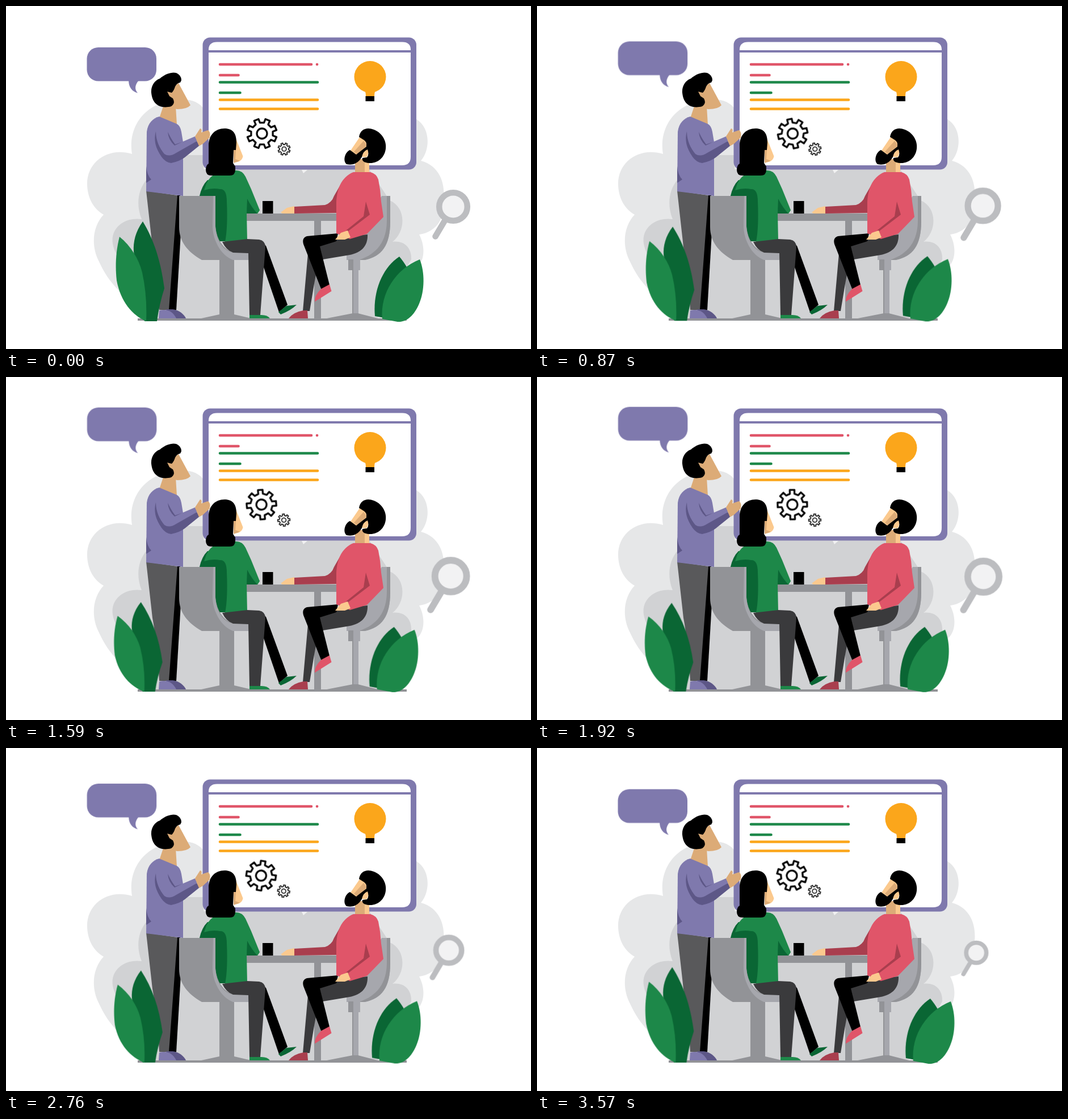
An HTML page that plays this animation: 925 by 605 pixels, repeating every 3600 ms.

```html
<!DOCTYPE html>
<html lang="en">
<head>
<meta charset="utf-8">
<title>Team meeting</title>
<style>
html, body { margin: 0; width: 100%; height: 100%; overflow: hidden; background: #fff; }
svg { display: block; width: 925px; height: 605px; }
svg g { transform-origin: 0 0; }
.purple { fill: #7f79ad; } .plum { fill: #5d5787; }
.green { fill: #1d8849; } .forest { fill: #0a6634; }
.red { fill: #e05569; } .wine { fill: #a93e4e; }
.skin { fill: #dcab77; } .peach { fill: #fbc98e; }
.grey { fill: #929397; } .silver { fill: #a6a7ad; }
.pants { fill: #59595b; } .dark { fill: #3a3a3c; }
.orange { fill: #fba61b; }
.rules path { fill: none; stroke-width: 4.6; stroke-linecap: round; }
.gear { fill: #fff; stroke: #0b0b0b; stroke-linejoin: round; }
</style>
</head>
<body>
<svg viewBox="0 0 925 605">
  <g id="clouds">
    <path fill="#e6e7e8" d="M349 182C338 166 316 162 300 168C255 166 213 205 222 261C180 248 143 275 143 313C143 338 154 358 172 368C152 389 150 423 163 449C172 469 183 486 198 501L240 551H690L724 461C738 449 739 424 728 403C752 400 772 381 769 354C777 318 766 282 731 273C748 253 748 214 722 199Z"/>
    <path fill="#d1d2d4" d="M248 306C232 324 229 352 239 376C208 372 184 392 188 419C190 430 194 438 200 445L240 551H655L714 447C715 425 700 413 681 416C706 396 704 354 676 343L640 288H348V263H300Z"/>
    <path fill="#f1f1f2" d="M521 289H531L524 295Z"/>
  </g>

  <g id="board">
    <rect class="purple" x="346.500" y="55.500" width="376.500" height="233" rx="13"/>
    <path fill="#fff" d="M357 78V77Q357 63.500 372 63.500H698Q713 63.500 713 77V78ZM357 82H713V266Q713 281 698 281H372Q357 281 357 266Z"/>
    <g class="rules">
      <path stroke="#e05569" d="M377 103H538M548 103h.1M377 122H409.500"/>
      <path stroke="#1d8849" d="M377 134.500H549M377 153H412.500"/>
      <path stroke="#fba61b" d="M377 165.500H549M377 181.500H549"/>
    </g>
    <circle class="orange" cx="641.500" cy="125" r="28"/>
    <path class="orange" d="M631 148H652Q649 151 649 160H634Q634 151 631 148Z"/>
    <path d="M633.500 159H649V168H633.500Z"/>
    <g id="bigGear" class="gear" stroke-width="3.300"></g>
    <g id="smallGear" class="gear" stroke-width="1.600"></g>
  </g>

  <g id="bubble" class="purple">
    <rect x="142.500" y="73" width="122.500" height="59.500" rx="20"/>
    <path d="M216 131C216 143 222 151 232 153.500C226 147 227 139 234 131Z"/>
  </g>

  <g id="lens">
    <path fill="none" stroke="#bcbdc0" stroke-width="10.500" stroke-linecap="round" d="M-14 23L-31.500 52.500"/>
    <circle r="24.800" fill="#f2f2f3" stroke="#bcbdc0" stroke-width="10.500"/>
  </g>

  <path class="grey" d="M232 551H706V555H232Z"/>

  <g id="presenter">
    <path d="M299 334H307L308 400L300 536H286Z"/>
    <path class="pants" d="M247 326L302 334L287 536H270C268 495 263 450 258 425Z"/>
    <path class="plum" d="M282 535H294C305 536 314 544 317 551H285Z"/>
    <path class="purple" d="M269 551L270 537Q291 532 300 551Z"/>
    <path class="skin" d="M277 177L270 198L301 209L299 177Z"/>
    <path class="skin" d="M284 150L304 136L325 175Q319 182 302 182L286 179Z"/>
    <path d="M256 153C255 141 262 131 271 128C281 119 293 116 300 118Q309 122 309 131L307 135Q301 136 298 142Q296 149 292 153L284 151L288 159L294 163Q299 172 291 177C272 182 258 174 256 153Z"/>
    <path class="purple" d="M248 222C250 206 259 198 270 195L301 208Q307 211 309 222L312 240V335L247 327Z"/>
    <path class="plum" d="M247 282Q248 298 256 306L247 312Z"/>
    <path class="plum" d="M264 221C260 236 263 250 274 266Q281 276 291 277Q306 274 315 267L341 246L336 238L285 260Z"/>
    <path class="purple" d="M264 221C264 238 271 251 279 261Q288 267 300 259L337 238L333 230L298 245L285 222L275 209Z"/>
    <path class="plum" d="M285 222Q286 236 297 246L310 240L298 244Q291 235 285 222Z"/>
    <path class="skin" d="M333 230L342 216Q346 217 344 223L356 219Q361 222 359 232L347 243L340 247Z"/>
  </g>

  <g id="table">
    <path class="grey" d="M420 366H586V379H555V551H543V379H420Z"/>
    <path d="M452 344H470.500V366H452Z"/>
  </g>

  <g id="woman">
    <path class="forest" d="M341 335Q345 317 355 307L380 312L395 340L390 415H369V335Z"/>
    <path class="green" d="M353 313Q360 299 372 295L404 290Q416 289 422 301L432 323L447 360L443 366L424 365L425 414L386 416Q391 390 389 345Q389 322 377 323Q364 320 349 325Z"/>
    <path class="forest" d="M425 340L424 366H443Q433 356 425 340Z"/>
    <path class="green" d="M427 337L447 360L443 366Q433 355 427 337Z"/>
    <path class="peach" d="M404 231L417.500 265Q416 275 402 276Z"/>
    <path class="skin" d="M401 254L405 253L404 270L412 273L401 277Z"/>
    <path d="M357 246C357 227 369 216 385 216C400 216 406 225 406 241L405 254H401L400 277L404 283V289Q404 299 394 299H362Q352 299 352 289Q352 281 357 278Z"/>
    <path class="grey" d="M305 335H369V390Q373 424 400 435L427 436V448H345C320 434 305 415 305 390Z"/>
    <path class="silver" d="M365 335H369V388C371 416 383 433 402 435H428V448H400C377 439 363 410 364 385Z"/>
    <path class="grey" d="M376 448H402V544L432 551V553H344V551L376 544Z"/>
    <path d="M450 417L458 423L496 527L481 540L452 455Z"/>
    <path class="dark" d="M381 416L425 411L446 412Q457 414 457 425L448 545H429L427 436L400 435Q388 431 381 416Z"/>
    <path class="green" d="M429 545H450Q461 545 465 551H429Z"/>
    <path class="forest" d="M480 540L494 529L512 527Q502 537 484 544Z"/>
  </g>

  <g id="guest">
    <path class="silver" d="M662 335H677V380C677 422 662 442 632 448H600V438L625 395Z"/>
    <path class="grey" d="M671 335H677V380C677 422 662 442 632 448H622C654 437 671 415 671 378Z"/>
    <path class="silver" d="M603 447H624V466H621V543H610V466H603Z"/>
    <path class="grey" d="M603 447H612V543H610V466H603ZM565 551L611 542H620L655 551V553H565Z"/>
    <path class="dark" d="M533 425L556 420L543 490L535 538H523Z"/>
    <path class="dark" d="M552 421L600 407L637 403C638 425 624 437 600 440L558 447Z"/>
    <path d="M585 401L530 406Q521 409 524 420L556 501L570 492L553 424L582 415Z"/>
    <path class="red" d="M555 499L570 491L573.500 503L544 521.500Q543 511 555 499Z"/>
    <path class="wine" d="M498 551Q506 540 524 537H531L532 551Z"/>
    <path class="skin" d="M615 270H640V294H615Z"/>
    <path class="peach" d="M632 276H640V294H632Z"/>
    <path class="wine" d="M594 307L578 335Q574 347 562 351L508 354V366L584 365Z"/>
    <path class="peach" d="M508 353L495 356L484 364L487 366H508Z"/>
    <path class="red" d="M612 293H642Q653 296 656 306Q660 325 661 345L665 372L636 402L606 411L582 401V350C582 325 590 302 612 293Z"/>
    <path class="wine" d="M634 345L641 368L603 397L599 396L630 371Z"/>
    <path class="peach" d="M580 412L590 400L602 396L607 408L597 412Z"/>
    <path class="peach" d="M624 230L607 255L618 263L636 252L634 235Z"/>
    <path class="skin" d="M630 238L636 246L624 257L618 261L613 257Z"/>
    <path d="M622 231C624 217 636 213 648 218C664 224 671 240 669 252C667 268 654 278 640 277Q626 276 628 268L636 267Q641 260 636 254L623 272Q614 282 600 279C593 273 597 258 606 254L617 262L635 248Q636 239 630 236Z"/>
    <path class="peach" d="M627 266Q629 256 637 253Q640 260 635 267Z"/>
  </g>

  <g id="leftPlant">
    <path class="forest" d="M5 -176C-8 -158 -12 -140 -11 -123L8 0H30Q34 -30 43 -58C37 -105 25 -143 5 -176Z"/>
    <path class="green" d="M-36 -149C-44 -118 -43 -90 -41 -72C-34 -34 -13 -10 11 0Q13 -45 4 -86C-2 -110 -16 -133 -36 -149Z"/>
  </g>
  <g id="rightPlant">
    <path class="forest" d="M693 442C664 461 646 502 650 547L666 550L707 462Q700 450 693 442Z"/>
    <path class="green" d="M729 447C738 469 738 502 728 525C719 546 706 558 690 557L663 552C659 506 687 464 729 447Z"/>
  </g>
</svg>

<script>
const LOOP = 3600;
const el = id => document.getElementById(id);

// Eight-toothed cog around 0,0, with a gap pointing up
function gear(id, outer, root, hub) {
  const pts = [];
  const add = (r, deg) => {
    const a = deg * Math.PI / 180;
    pts.push((r * Math.cos(a)).toFixed(2) + ',' + (r * Math.sin(a)).toFixed(2));
  };
  for (let i = 0; i < 8; i++) {
    const mid = 22.5 + i * 45;
    add(root, mid - 12);
    add(outer, mid - 9);
    add(outer, mid + 9);
    add(root, mid + 12);
  }
  el(id).innerHTML = `<polygon points="${pts.join(' ')}"/><circle r="${hub}"/>`;
}
gear('bigGear', 26.3, 19.4, 9);
gear('smallGear', 10.9, 8, 3.8);

const move = (x, y, rest = '') => `translate(${x}px, ${y}px) ${rest}`;

// Each step: [offset, transform]; two steps at one offset make a jump
const tracks = {
  bubble: [[0, move(0, 0)], [.5, move(.4, -21.8)], [1, move(0, 0)]],
  rightPlant: [[0, move(0, 0)], [.5, move(-10.6, -1.3)], [1, move(0, 0)]],
  leftPlant: [
    [0, move(236, 556, 'scale(1, 1)')],
    [.5, move(232.2, 555, 'scale(1, .885)')],
    [1, move(233.3, 555, 'scale(1, .958)')]
  ],
  lens: [
    [0, move(788, 354, 'scale(1)')],
    [.5, move(783, 350.8, 'scale(1.145)')],
    [.5, move(787.4, 351.6, 'scale(1.145)')],
    [1, move(773.7, 361.3, 'scale(.71)')]
  ],
  bigGear: [[0, move(451, 225, 'rotate(0deg)')], [1, move(449, 225.2, 'rotate(40deg)')]],
  smallGear: [[0, move(490, 252.3, 'rotate(0deg)')], [1, move(489, 252.5, 'rotate(40deg)')]]
};

for (const [id, steps] of Object.entries(tracks)) {
  el(id).animate(
    steps.map(([offset, transform]) => ({ offset, transform })),
    { duration: LOOP, iterations: Infinity }
  );
}
</script>
</body>
</html>
```
